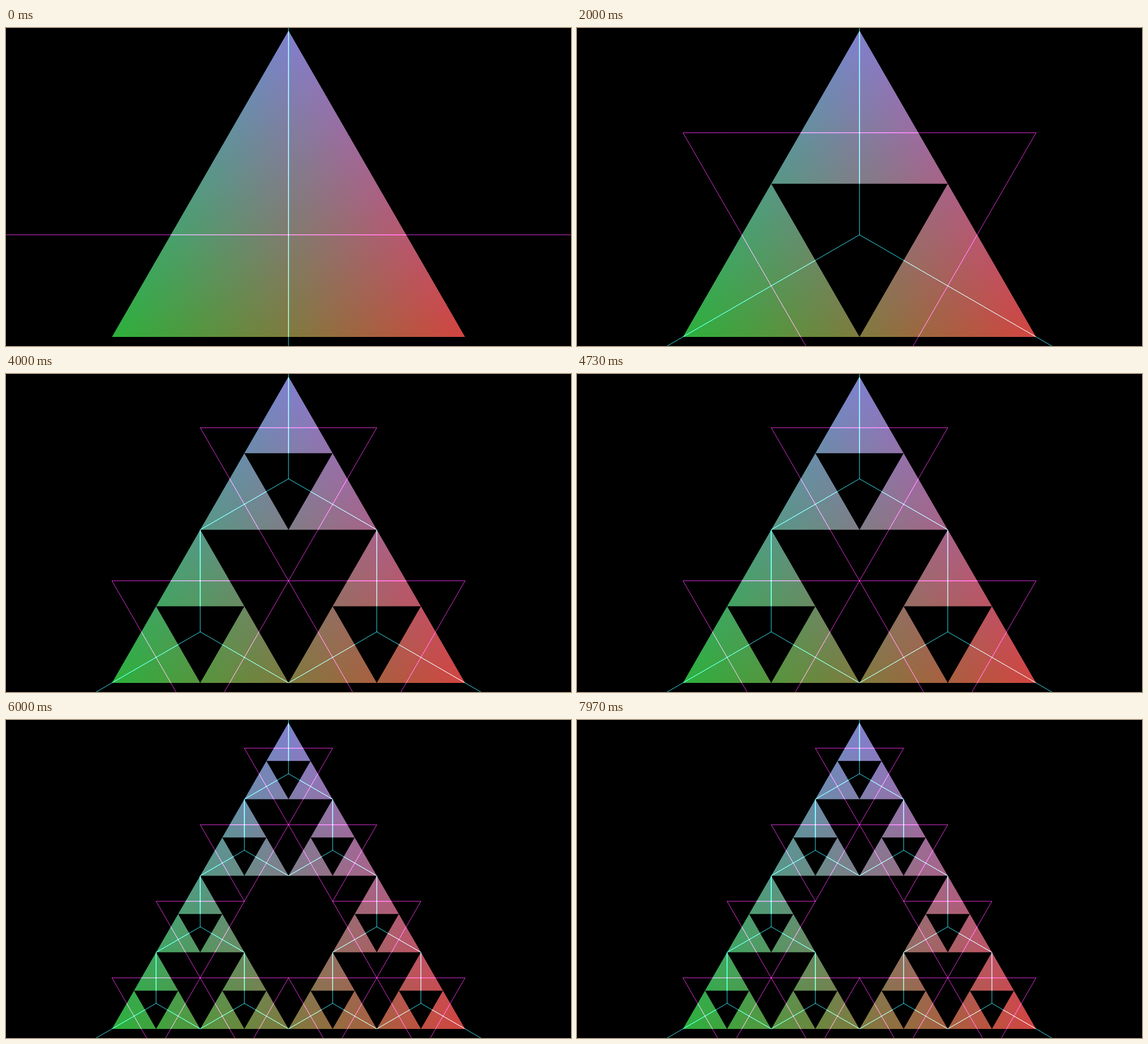
Recreate the animation shown at these times as an HTML page with a canvas. Size 998 by 561 pixels, loop 8 s.

```html
<!DOCTYPE html>
<html lang="en">
<head>
<meta charset="utf-8">
<title>Folding triangles</title>
<style>
  html, body { margin: 0; width: 100%; height: 100%; overflow: hidden; background: #000; }
  canvas { display: block; width: 100%; height: 100%; }
</style>
</head>
<body>
<canvas id="stage" width="998" height="561"></canvas>
<script>
const ctx = document.getElementById('stage').getContext('2d');
const W = 998, H = 561;
const LOOP = 8000, HOLD = 2000;
const CENTER = [499, 364.85], RADIUS = 360.1;
const CYAN = 'rgb(52,216,230)', MAGENTA = 'rgb(222,46,212)';
const HUES = ['rgb(128,128,206)', 'rgb(44,176,60)', 'rgb(210,68,64)'];

// Corners: top, bottom left, bottom right
const ROOT = [-90, 150, 30].map(deg => {
  const a = deg * Math.PI / 180;
  return [CENTER[0] + RADIUS * Math.cos(a), CENTER[1] + RADIUS * Math.sin(a)];
});

const mix = (p, q, k) => [p[0] + (q[0] - p[0]) * k, p[1] + (q[1] - p[1]) * k];
const centroid = t => mix(t[0], mix(t[1], t[2], 0.5), 2 / 3);
const split = t => t.map(p => t.map(q => mix(p, q, 0.5)));

// One gradient per corner, black at the opposite edge; together they blend linearly
const gradients = ROOT.map((p, i) => {
  const foot = mix(ROOT[(i + 1) % 3], ROOT[(i + 2) % 3], 0.5);
  const g = ctx.createLinearGradient(...p, ...foot);
  g.addColorStop(0, HUES[i]);
  g.addColorStop(1, '#000');
  return g;
});

function addTriangle(path, t) {
  path.moveTo(...t[0]);
  path.lineTo(...t[1]);
  path.lineTo(...t[2]);
  path.closePath();
}

function addLine(path, p, q) {
  path.moveTo(...p);
  path.lineTo(...q);
}

function buildLevel(level) {
  const fill = new Path2D(), rays = new Path2D(), folds = new Path2D();
  if (level === 0) {
    addTriangle(fill, ROOT);
    addLine(rays, [CENTER[0], 0], [CENTER[0], H]);
    addLine(folds, [0, CENTER[1]], [W, CENTER[1]]);
    return { fill, rays, folds };
  }
  let parents = [ROOT];
  for (let i = 1; i < level; i++) parents = parents.flatMap(split);
  for (const t of parents) {
    const c = centroid(t);
    split(t).forEach(child => addTriangle(fill, child));
    t.forEach(p => addLine(rays, c, p));
    addTriangle(folds, t.map(p => mix(c, p, -1)));
  }
  ROOT.forEach(p => addLine(rays, p, mix(CENTER, p, 2)));
  return { fill, rays, folds };
}

const levels = [0, 1, 2, 3].map(buildLevel);

function draw(time) {
  const { fill, rays, folds } = levels[Math.floor((time % LOOP) / HOLD)];
  ctx.globalCompositeOperation = 'source-over';
  ctx.fillStyle = '#000';
  ctx.fillRect(0, 0, W, H);
  ctx.globalCompositeOperation = 'lighter';
  for (const g of gradients) {
    ctx.fillStyle = g;
    ctx.fill(fill);
  }
  ctx.lineWidth = 1;
  ctx.lineJoin = 'round';
  ctx.strokeStyle = MAGENTA;
  ctx.stroke(folds);
  ctx.strokeStyle = CYAN;
  ctx.stroke(rays);
}

const start = performance.now();
function tick() {
  draw(performance.now() - start);
  requestAnimationFrame(tick);
}
tick();
</script>
</body>
</html>
```
